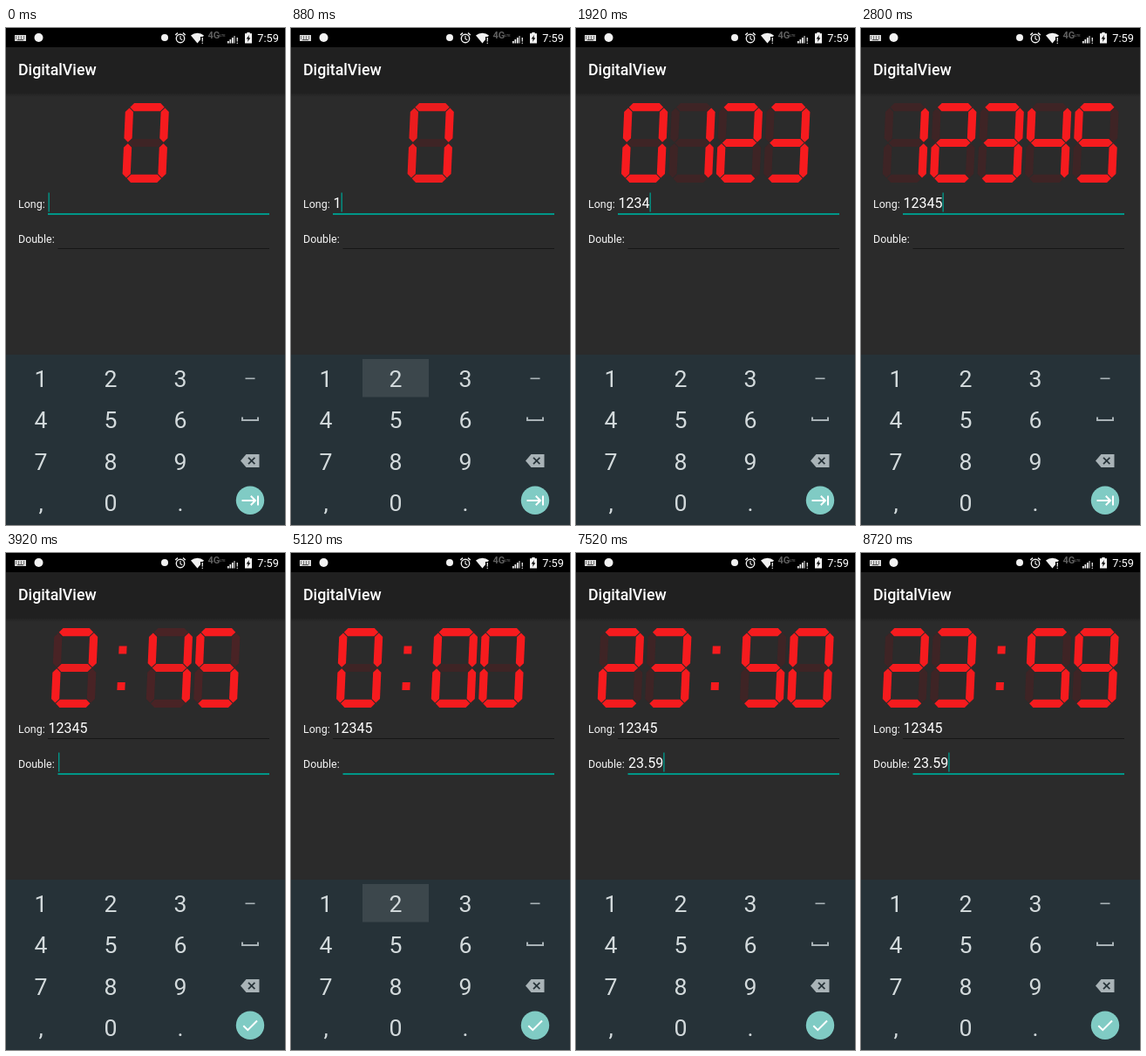
These frames come from a looping animation (320x569 px, 9120 ms). An HTML page with a canvas:

```html
<!DOCTYPE html>
<html lang="en">
<head>
<meta charset="utf-8">
<title>DigitalView</title>
<style>
  html, body { margin: 0; width: 100%; height: 100%; overflow: hidden; background: #000; }
  canvas { display: block; width: 320px; height: 569px; }
</style>
</head>
<body>
<canvas id="stage" width="320" height="569"></canvas>
<script>
const ctx = document.getElementById('stage').getContext('2d');
const LOOP = 9120, HOLD = 160, FADE_DELAY = 120, FADE = 280;
const TEAL = '#009688', MINT = '#80cbc4', KEY_TEXT = '#d3dadc', KEY_ICON = '#a9b3b7', WHITE = '#f2f2f2';
const LIT = [246, 27, 30], DIM = [62, 36, 37];
const KEYS = '123456789,0.', NEXT = '>';
const ROW = 47.5, COLUMN = 80, PITCH = 54.4;

// Lit segments of 0 to 9: a to f run clockwise from the top, g is the middle
const DIGITS = 'abcdef bc abdeg abcdg bcfg acdfg acdefg abc abcdefg abcdfg'.split(' ');

// Each key and the moment it is released
const STROKES = [
  ['1', 720], ['2', 1040], ['3', 1520], ['4', 1920], ['5', 2400], [NEXT, 3760],
  ['2', 5200], ['3', 5680], ['.', 6000], ['5', 6720], ['9', 7520]
].map(([key, time]) => ({ key, time }));
const CURSOR_HIDDEN = [[4320, 5200], [6320, 6640], [8320, 8720]];

const within = (t, from, to) => t >= from && t < to;
const smooth = p => { p = Math.min(1, Math.max(0, p)); return p * p * (3 - 2 * p); };
const blend = k => `rgb(${DIM.map((d, i) => Math.round(d + (LIT[i] - d) * k))})`;

function formatFields([long, double]) {
  if (double === undefined) return long || '0';
  const [whole, part = ''] = double.split('.');
  return `${whole || 0}:${part.padEnd(2, '0')}`;
}

// Replays the strokes up to t: field texts, readout, and when the readout last changed
function stateAt(t) {
  const state = { fields: [''], before: '0', after: '0', changed: 0 };
  for (const { key, time } of STROKES.filter(s => s.time <= t)) {
    if (key === NEXT) state.fields.push('');
    else state.fields[state.fields.length - 1] += key;
    const readout = formatFields(state.fields);
    if (readout === state.after) continue;
    state.before = state.after.padStart(readout.length, '0').slice(-readout.length);
    state.after = readout;
    state.changed = time;
  }
  return state;
}

function rect(color, x, y, w, h) {
  ctx.fillStyle = color;
  ctx.fillRect(x, y, w, h);
}
function disc(color, x, y, r) {
  ctx.fillStyle = color;
  ctx.beginPath();
  ctx.arc(x, y, r, 0, Math.PI * 2);
  ctx.fill();
}
function trace(points) {
  ctx.beginPath();
  points.forEach(([x, y], i) => i ? ctx.lineTo(x, y) : ctx.moveTo(x, y));
}
function shape(color, ...points) {
  trace(points);
  ctx.fillStyle = color;
  ctx.fill();
}
function line(color, width, ...points) {
  trace(points);
  ctx.strokeStyle = color;
  ctx.lineWidth = width;
  ctx.stroke();
}
function text(str, x, y, size, color, weight = 400, align = 'left') {
  ctx.font = `${weight} ${size}px Roboto, sans-serif`;
  ctx.textAlign = align;
  ctx.fillStyle = color;
  ctx.fillText(str, x, y);
}

function drawSegment(index, color) {
  const angle = index * Math.PI / 3, middle = index === 6;
  const side = middle ? 0 : Math.round(Math.sin(angle));
  const tip = 19.7, half = 4.6, shoulder = tip - half;
  ctx.save();
  ctx.translate(side * 20.4, middle ? 0 : -Math.cos(angle) * 40.8);
  if (side) ctx.rotate(Math.PI / 2);
  shape(color, [-tip, 0], [-shoulder, -half], [shoulder, -half],
    [tip, 0], [shoulder, half], [-shoulder, half]);
  ctx.restore();
}

function drawReadout(t, { before, after, changed }) {
  const k = smooth((t - changed - FADE_DELAY) / FADE);
  [...after].forEach((char, i) => {
    ctx.save();
    ctx.transform(1, 0, -0.045, 1, 160.2 + (i - (after.length - 1) / 2) * PITCH, 131.5);
    if (char === ':') {
      for (const y of [-25, 16.5]) rect(blend(1), -4.5, y, 9, 9);
    } else {
      const isLit = (digit, s) => +DIGITS[digit].includes(s);
      [...'abcdefg']
        .map((s, index) => [index, isLit(before[i], s) * (1 - k) + isLit(char, s) * k])
        .sort((a, b) => a[1] - b[1])
        .forEach(([index, level]) => drawSegment(index, blend(level)));
    }
    ctx.restore();
  });
}

function drawField(label, value, x, baseline, focused, cursor) {
  text(label, 14, baseline, 12.44, '#f4f4f4');
  text(value, x + 0.5, baseline, 16, '#ffffff');
  const width = ctx.measureText(value).width;
  rect(focused ? TEAL : '#161616', x, baseline + 6, 302 - x, focused ? 2 : 1);
  if (focused && cursor) rect(TEAL, x + 0.5 + width, baseline - 17.5, 1.4, 22);
}

function drawStatusBar() {
  rect('#000', 0, 0, 320, 22);
  rect('#d8d8d8', 10, 8, 13, 7);
  for (let i = 0; i < 8; i++) rect('#222', 11 + (i % 4) * 3, 9.5 + Math.floor(i / 4) * 2, 1, 1);
  rect('#222', 13, 13.3, 7, 0.8);
  disc(WHITE, 37.5, 11, 5);
  disc(WHITE, 182, 11, 4);

  // Alarm clock
  disc(WHITE, 200, 12, 5.4);
  disc('#000', 200, 12, 4);
  line(WHITE, 1.1, [200, 9], [200, 12.4], [202.3, 13.7]);
  for (const side of [-1, 1]) line(WHITE, 1.4, [200 + side * 5.8, 8], [200 + side * 3, 5.6]);

  // Wi-Fi, network type and signal
  ctx.beginPath();
  ctx.moveTo(219.5, 17.5);
  ctx.arc(219.5, 17.5, 11.8, -Math.PI * 0.72, -Math.PI * 0.28);
  ctx.fillStyle = WHITE;
  ctx.fill();
  rect('#000', 223, 10, 5, 8);
  text('!', 224, 17.5, 9, WHITE, 700);
  text('4G', 231.5, 12, 11, '#606060', 700);
  text('LTE', 245, 10, 4, '#606060', 700);
  for (let i = 0; i < 4; i++) rect(WHITE, 254 + i * 2.5, 15 - i * 2, 1.7, 2.5 + i * 2);
  rect('#000', 262.5, 8, 4, 10);
  text('!', 264, 17.5, 9, WHITE, 700);

  // Battery and clock
  rect(WHITE, 276.3, 5, 3.4, 2);
  rect(WHITE, 274, 6.2, 8, 11.3);
  shape('#000', [279, 8], [275.7, 12.6], [277.7, 12.6], [277, 16], [280.3, 11.2], [278.3, 11.2]);
  text('7:59', 313, 15.6, 12.8, '#ffffff', 400, 'right');
}

function drawKeyboard(t, lastField) {
  rect('#263238', 0, 374, 320, 195);
  const pressed = STROKES.find(s => within(t, s.time - HOLD, s.time))?.key;

  [...KEYS].forEach((key, i) => {
    const x = COLUMN * (i % 3 + 0.5), y = 401 + ROW * Math.floor(i / 3);
    if (key === pressed) rect('#3c474c', x - 38, y - 22, 76, 43.5);
    text(key, x, y + 9.6, 26.67, KEY_TEXT, 400, 'center');
  });

  rect(KEY_ICON, 274.5, 400.5, 11, 1.6);
  line(KEY_ICON, 2, [271, 445.5], [271, 449], [289, 449], [289, 445.5]);
  shape(KEY_ICON, [269, 495.5], [275.5, 488], [290.5, 488], [290.5, 503], [275.5, 503]);
  for (const d of [-3.7, 3.7]) line('#263238', 1.7, [281.7 - d, 491.8], [281.7 + d, 499.2]);

  disc(pressed === NEXT ? '#6fb2ac' : MINT, 280, 540.8, 16.2);
  if (lastField) {
    line('#fff', 2, [272.3, 541.2], [277.3, 546.2], [288, 535.5]);
  } else {
    line('#fff', 2, [270.5, 541], [285.5, 541]);
    line('#fff', 2, [280.8, 535.8], [286, 541], [280.8, 546.2]);
    line('#fff', 2, [289, 535.5], [289, 546.5]);
  }
}

function draw(t) {
  rect('#2b2b2b', 0, 0, 320, 569);
  rect('#202020', 0, 22, 320, 53);
  const shade = ctx.createLinearGradient(0, 75, 0, 79);
  shade.addColorStop(0, 'rgba(0,0,0,.2)');
  shade.addColorStop(1, 'rgba(0,0,0,0)');
  rect(shade, 0, 75, 320, 4);
  text('DigitalView', 14, 54, 17.78, '#ffffff', 500);

  const state = stateAt(t);
  const [long, double = ''] = state.fields;
  const lastField = state.fields.length > 1;
  const cursor = !CURSOR_HIDDEN.some(([from, to]) => within(t, from, to));
  drawStatusBar();
  drawReadout(t, state);
  drawField('Long:', long, 48, 206, !lastField, cursor);
  drawField('Double:', double, 59.5, 246, lastField, cursor);
  drawKeyboard(t, lastField);
}

const startTime = performance.now();
function tick() {
  draw((performance.now() - startTime) % LOOP);
  requestAnimationFrame(tick);
}
tick();
</script>
</body>
</html>
```
